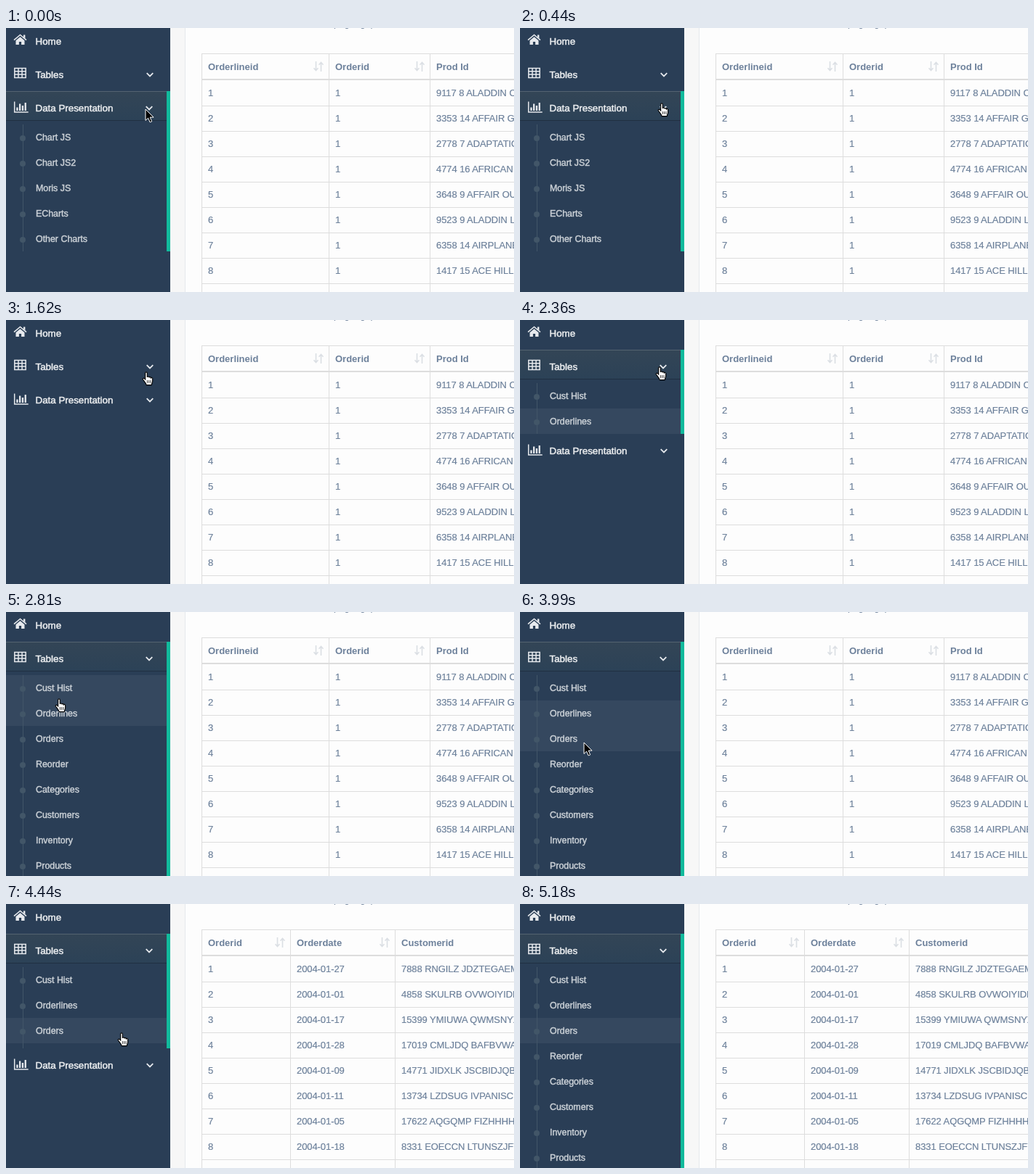
Write an HTML page that moves like this. It is 699 by 364 pixels and loops after 5780 ms.

```html
<!DOCTYPE html>
<html lang="en">
<head>
<meta charset="utf-8">
<title>Sidebar menu</title>
<style>
html, body { margin: 0; width: 100%; height: 100%; overflow: hidden; background: #f7f7f7; }
svg { display: block; }
text { font: 13px "Liberation Sans", Arial, sans-serif; fill: #6d819b; white-space: pre; }
.cells text { stroke: #6d819b; stroke-width: .2px; letter-spacing: -.08px; }
.cells .head { font-weight: bold; stroke: none; letter-spacing: 0; }
.label { font-size: 13.35px; fill: #eceef0; stroke: #eceef0; stroke-width: .5px; }
.item { font-size: 12.4px; fill: #cad0d6; stroke: #cad0d6; stroke-width: .45px; }
.icon { fill: #e6e9ed; }
.line { fill: none; stroke: #e6e9ed; stroke-width: 1.5; }
</style>
</head>
<body>
<svg id="stage" width="699" height="364"></svg>
<script>
const LOOP = 5780, STEP = 148, LEAD = 8, LAST = 35, SLIDE = 400, ROW = 35;
const CLOSE = 601, OPEN = 2235, RELOAD = 4266;

const rect = (x, y, w, h, fill, more = '') =>
  `<rect x="${x}" y="${y}" width="${w}" height="${h}" fill="${fill}" ${more}/>`;
const text = (x, y, s, cls = '') => `<text x="${x}" y="${y}" class="${cls}">${s}</text>`;
const path = (d, cls) => `<path d="${d}" class="${cls}"/>`;

const icons = {
  home: path('M11 21.6L19.5 14.4 28 21.6', 'line') +
    path('M24 14.5h2.4v5l-2.4-2zM13.5 22.2l6-5 6 5v5.8h-4.4v-4h-3.2v4h-4.4z', 'icon'),
  table: path('M11.8 14.5h15.4v13h-15.4zM11.8 18.7h15.4M11.8 23.1h15.4M17 15v12M22.1 15v12', 'line'),
  chart: path('M11.7 14.5v14.5h19', 'line') +
    path('M14.3 22.5h2.3v4.5h-2.3zM18 17.5h2.3v9.5h-2.3zM21.8 20h2.3v7h-2.3zM25.6 16h2.3v11h-2.3z', 'icon')
};

// Sidebar entry; its submenu is a nested svg whose height clips the items
function entry(id, y, label, icon, items) {
  const rows = items.map((s, i) =>
    rect(0, i * ROW, 221, ROW, '#fff', 'opacity="0" class="shade"') +
    rect(23, i * ROW, 1, ROW, '#425668') +
    `<circle cx="23" cy="${i * ROW + 19}" r="4" fill="#425668"/>` +
    text(41, i * ROW + 22, s, 'item')).join('');
  const active = rect(0, 0, 221, 40, 'url(#glow)') + rect(0, 0, 221, 1, '#fff', 'opacity=".16"') +
    rect(0, 40, 221, 1, '#000', 'opacity=".25"') + rect(221, 0, 5, 46, '#12ba9c', 'class="bar"');
  return `<g id="${id}" transform="translate(0 ${y})"><g class="active" display="none">${active}</g>` +
    icons[icon] + text(40.5, 28, label, 'label') +
    (items.length ? '<path d="M193.7 21.2l4.3 4.3 4.3-4.3" class="line chev" style="stroke-width:1.8"/>' : '') +
    `<svg class="menu" y="46" width="226" height="0">${rows}</svg></g>`;
}

// Data table: column left edges, headings and rows
function grid(id, cols, heads, rows) {
  let s = rect(269, 35, 430, 1, '#ddd') + rect(269, 70, 430, 2, '#ddd');
  for (const x of cols) s += rect(x, 35, 1, 329, '#ddd');
  for (const x of cols.slice(1))
    s += `<path d="M${x - 17.5} 46v12.5m-3-3.2l3 3.2 3-3.2M${x - 10.5} 60v-12.5m-3 3.2l3-3.2 3 3.2" fill="none" stroke="#dbdfe4" stroke-width="1.6"/>`;
  heads.forEach((h, i) => s += text(cols[i] + 9, 58, h, 'head'));
  rows.forEach((r, j) => {
    s += rect(269, 107 + j * ROW, 430, 1, '#ddd');
    [j + 1, ...r].forEach((c, i) => s += text(cols[i] + 9, 94 + j * ROW, c));
  });
  return `<g id="${id}" class="cells">${s}</g>`;
}

const lines = ['9117 8 ALADDIN CA', '3353 14 AFFAIR GE', '2778 7 ADAPTATION', '4774 16 AFRICAN',
  '3648 9 AFFAIR OUT', '9523 9 ALADDIN LE', '6358 14 AIRPLANE', '1417 15 ACE HILLS'].map(s => [1, s]);
const orders = ['27 7888 RNGILZ JDZTEGAEMD', '01 4858 SKULRB OVWOIYIDDL', '17 15399 YMIUWA QWMSNYXX',
  '28 17019 CMLJDQ BAFBVWAL', '09 14771 JIDXLK JSCBIDJQBE', '11 13734 LZDSUG IVPANISCII',
  '05 17622 AQGQMP FIZHHHHH', '18 8331 EOECCN LTUNSZJFYT'].map(s => ['2004-01-' + s.slice(0, 2), s.slice(3)]);

const stage = document.getElementById('stage');
stage.innerHTML = `<defs><linearGradient id="glow" x2="0" y2="1">
  <stop stop-color="#334556"/><stop offset="1" stop-color="#2c4257"/></linearGradient></defs>` +
  rect(0, 0, 699, 364, '#f7f7f7') + rect(246, 0, 453, 364, '#fdfdfd') + rect(246, 0, 1, 364, '#e6e9ed') +
  text(451, -2, 'page, grip') +
  grid('lines', [269, 444, 583], ['Orderlineid', 'Orderid', 'Prod Id'], lines) +
  grid('orders', [269, 391, 535], ['Orderid', 'Orderdate', 'Customerid'], orders) +
  rect(0, 0, 226, 364, '#2a3e56') +
  entry('home', -5, 'Home', 'home', []) +
  entry('tables', 41, 'Tables', 'table', ['Cust Hist', 'Orderlines', 'Orders', 'Reorder',
    'Categories', 'Customers', 'Inventory', 'Products']) +
  entry('data', 87, 'Data Presentation', 'chart', ['Chart JS', 'Chart JS2', 'Moris JS', 'ECharts', 'Other Charts']) +
  `<path id="arrow" d="M0 0v15.5l3.6-3.4 2.5 5.8 2.6-1.1-2.5-5.7h4.9z" stroke="#fff"/>
  <g id="hand"><g stroke="#000" transform="translate(-.5 -.5) scale(1.15 1.1)">
  <path fill="#fff" d="M3.6 1.6c0-1.7 2.3-1.7 2.3 0v5c.3-1 2.2-.9 2.3.4.3-.8 2-.7 2.2.6.4-.7 1.9-.4 1.9 1v3c0 2-1 2.5-1.2 4.9H5C4.5 14 2 11.5.8 9.6c-.7-1.2.8-2 1.8-1.2l1 1.2z"/>
  <path d="M6 10.5v3.5M8 10.5v3.5M10 10.5v3.5" stroke-width=".7"/></g></g>`;

// Pointer: step, shape, x, y
const pointer = [
  [0, 'arrow', 192, 112], [1, 'hand', 188, 111], [2, 'hand', 189, 107], [3, 'hand', 190, 104],
  [4, 'hand', 190, 103], [7, 'hand', 189, 94], [8, 'hand', 188, 80], [9, 'hand', 186, 75],
  [11, 'hand', 188, 72], [12, 'hand', 188, 68], [13, 'hand', 187, 65], [17, 'hand', 155, 79],
  [18, 'hand', 105, 100], [19, 'hand', 68, 120], [20, 'hand', 75, 146], [21, 'hand', 82, 170],
  [22, 'hand', 84, 179], [26, 'arrow', 88, 179], [27, 'arrow', 88, 180], [28, 'arrow', 108, 181],
  [29, 'arrow', 138, 180], [30, 'hand', 154, 178], [31, 'hand', 166, 177], [32, 'hand', 171, 176],
  [34, 'arrow', 272, 212], [35, '', 0, 0]];

const $ = s => stage.querySelector(s);
const show = (el, on) => el.setAttribute('display', on ? 'inline' : 'none');
const swing = ms => .5 - Math.cos(Math.PI * Math.min(1, Math.max(0, ms / SLIDE))) / 2;

function setEntry(id, active, height) {
  const el = $('#' + id);
  show(el.querySelector('.active'), active);
  el.querySelector('.bar').setAttribute('height', 46 + height);
  el.querySelector('.menu').setAttribute('height', height);
  el.querySelector('.chev').setAttribute('transform', `translate(${active ? -1 : 0} 0)`);
}

function draw(now) {
  const n = Math.min(LAST, Math.floor((now % LOOP + LEAD) / STEP)), t = n * STEP;
  const loaded = t >= RELOAD;
  const tall = Math.round(8 * ROW * swing(t - (loaded ? RELOAD : OPEN)));
  setEntry('tables', t >= OPEN, tall);
  setEntry('data', t < CLOSE, Math.round(5 * ROW * (1 - swing(t - CLOSE))));
  $('#data').setAttribute('transform', `translate(0 ${87 + tall})`);
  show($('#lines'), !loaded);
  show($('#orders'), loaded);

  const [, shape, x, y] = pointer.filter(p => p[0] <= n).pop();
  for (const id of ['arrow', 'hand']) {
    show($('#' + id), id === shape);
    $('#' + id).setAttribute('transform', `translate(${x} ${y})`);
  }
  const hover = shape && x < 221 && y >= 87 ? Math.floor((y - 86) / ROW) : -1;
  const current = loaded ? 2 : 1;
  stage.querySelectorAll('#tables .shade').forEach((el, i) =>
    el.setAttribute('opacity', i === current || i === hover ? .05 : 0));
  requestAnimationFrame(draw);
}
requestAnimationFrame(draw);
</script>
</body>
</html>
```
